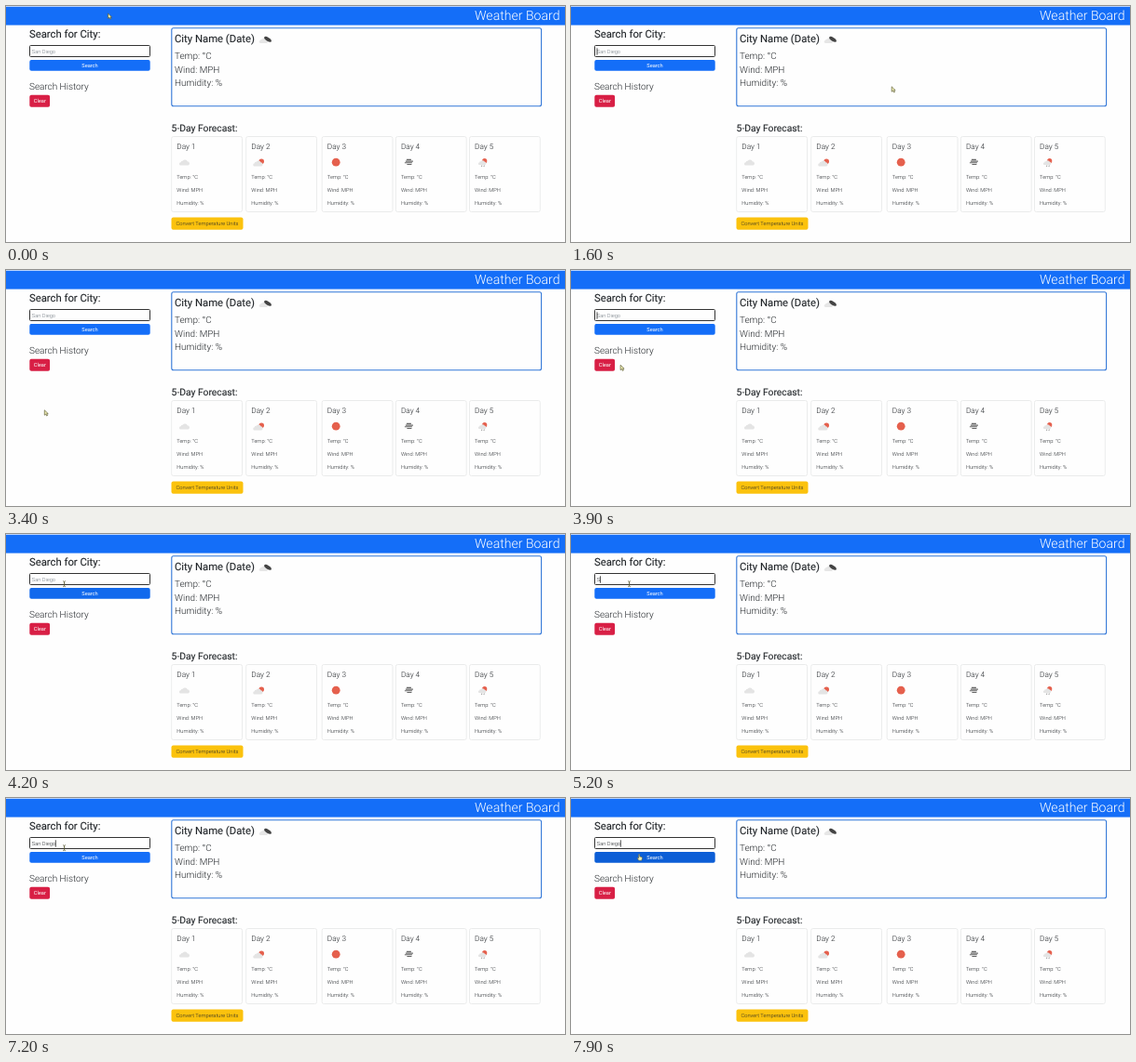
An HTML page for the animation above (8000 ms loop, 600x254 px).

```html
<!DOCTYPE html>
<html lang="en">
<head>
<meta charset="utf-8">
<title>Weather Board</title>
<style>
  html, body { margin: 0; width: 100%; height: 100%; overflow: hidden; background: #fefefe; }
  svg { display: block; width: 600px; height: 254px; }
  text { font: 300 5.7px Roboto, Inter, sans-serif; fill: #212529; text-rendering: geometricPrecision; }
  .brand { font-size: 14.1px; fill: #fff; text-anchor: end; }
  .heading { font-size: 11.3px; font-weight: 400; stroke: #212529; stroke-width: .12px; }
  .forecast { font-size: 10.3px; }
  .body { font-size: 9.95px; }
  .day { font-size: 8.2px; }
  .button { fill: #fff; font-weight: 400; text-anchor: middle; }
  .dark { fill: #212529; font-weight: 300; }
  .card { fill: #fefefe; stroke: #e6e7e8; stroke-width: .8; }
  .pointer { fill: #f1efb4; stroke: #55552f; stroke-width: .65; stroke-linejoin: round; }
</style>
</head>
<body>
<svg viewBox="0 0 600 254">
  <defs>
    <path id="cloud" d="M-5 4a2 2 0 0 1-.2-4 2 2 0 0 1 2.5-1.7A3.4 3.4 0 0 1 3.3-1.2 2.7 2.7 0 0 1 4.2 4Z"/>
  </defs>

  <rect y=".7" width="600" height="19.9" fill="#146ef8"/>
  <text class="brand" x="594.5" y="15.3">Weather Board</text>

  <text class="heading" x="25" y="33.6">Search for City:</text>
  <rect x="25.5" y="42.5" width="129" height="12" rx="1" fill="#fefefe" stroke="#333" stroke-width="1"/>
  <text id="field" x="27.8" y="51"></text>
  <rect id="caret" y="45.3" width=".8" height="7.4" fill="#222"/>
  <rect id="search" x="25.3" y="58" width="129.4" height="11.7" rx="2"/>
  <text class="button" x="90" y="66">Search</text>
  <text class="body" x="25" y="90.4">Search History</text>
  <rect x="25.3" y="95.7" width="21.8" height="13" rx="2" fill="#d81f45"/>
  <text class="button" x="36.3" y="104.4">Clear</text>

  <rect x="177.8" y="23.8" width="396.8" height="84" rx="2" fill="#fefefe" stroke="#3277d8" stroke-width="1.1"/>
  <text class="heading" x="181" y="38.8">City Name (Date)</text>
  <use href="#cloud" fill="#e6e6e6" transform="translate(277 37) scale(.75)"/>
  <ellipse rx="4.4" ry="1.9" fill="#444" transform="translate(281 35.8) rotate(32)"/>
  <text class="body" x="181" y="57">Temp: °C</text>
  <text class="body" x="181" y="71.5">Wind: MPH</text>
  <text class="body" x="181" y="86.2">Humidity: %</text>

  <text class="heading forecast" x="177.6" y="135.2">5-Day Forecast:</text>
  <g id="days"></g>
  <rect x="177.5" y="227.6" width="77" height="13.2" rx="2" fill="#fbc20d"/>
  <text class="button dark" x="216" y="236.2">Convert Temperature Units</text>

  <g id="cursor" class="pointer">
    <path id="arrow" d="M0 0V5.4L1.4 4.3 2.3 6.2 3.3 5.7 2.4 3.9H4Z"/>
    <path id="beam" fill="none" d="M-1.5-3Q0-3 0-2V2Q0 3-1.5 3M1.5-3Q0-3 0-2V2Q0 3 1.5 3"/>
    <path id="hand" stroke-width=".5" d="M-1.4-3.2Q-.8-3.8-.3-3.2V-.9L2-.4Q2.6 0 2.3 1.5L1.8 3.2H-1.3L-2.8.8Q-2.6 0-1.4.8Z"/>
  </g>
</svg>
<script>
const $ = id => document.getElementById(id);
const clamp = v => Math.max(0, Math.min(1, v));

const cloud = (x, y, s) =>
  `<use href="#cloud" fill="#e4e4e4" transform="translate(${x} ${y}) scale(${s})"/>`;
const sun = (x, y, r) => `<circle cx="${x}" cy="${y}" r="${r}" fill="#e5604d"/>`;
const lines = (d, color) => `<path d="${d}" fill="none" stroke="${color}" stroke-width="1.1"/>`;

// Icons are drawn around their own centre.
const icons = [
  cloud(.3, 0, .85),
  sun(2.5, -1, 2.8) + cloud(-.8, 1, .8),
  sun(1, 0, 4.4),
  lines('M-2.5-2.8H2.5M-3.5-1.1H4.5M-4.5.6H3.5M-2 2.3H3', '#666'),
  sun(2.2, -1.5, 2.6) + cloud(0, .2, .65) + lines('M-.5 3.4L-1.2 4.8M2 3.4L1.3 4.8', '#aaa')
];
const dayLefts = [177.7, 257.7, 339.2, 418.4, 497.5];
$('days').innerHTML = dayLefts.map((x, i) => `<g transform="translate(${x} 140.5)">
  <rect class="card" width="75.8" height="81" rx="2"/>
  <text class="day" x="5.6" y="13.6">Day ${i + 1}</text>
  <g transform="translate(14 27.7)">${icons[i]}</g>
  <text x="5.6" y="45.2">Temp: °C</text>
  <text x="5.6" y="59.4">Wind: MPH</text>
  <text x="5.6" y="73.4">Humidity: %</text></g>`).join('');

const LOOP = 8000, STEP = 100, BLINK = 500;
const city = 'San Diego';
const click = 4400;
// [time, letters typed so far]
const keys = [[5200, 1], [5500, 2], [5900, 3], [6100, 5], [6300, 6], [6500, 7], [6700, 8], [6900, 9]];
// [time, x, y]
const path = [
  [0, 109.5, 8], [100, 235, 50], [200, 344.2, 86.8], [3200, 344.2, 86.8], [3400, 41.3, 150.8],
  [3700, 41.3, 150.8], [4000, 59, 78], [4100, 62, 64], [4200, 62.5, 53.7],
  [7500, 62.5, 53.7], [7700, 74, 64], [LOOP, 74, 64]
];

function position(t) {
  const i = path.findIndex(p => p[0] > t);
  const [t0, x0, y0] = path[i - 1], [t1, x1, y1] = path[i];
  const k = (t - t0) / (t1 - t0);
  return [x0 + (x1 - x0) * k, y0 + (y1 - y0) * k];
}

function caretOn(t, lastKey) {
  if (t < 1500) return false;
  if (t < click) return Math.floor(t / BLINK) % 2 === 1;
  return Math.floor((t - lastKey) / BLINK) % 2 === 0;
}

const fade = (t, start, end) => clamp(Math.min((t - start) / 150, 1 - (t - end) / 150));

function draw(now) {
  const t = Math.floor(now % LOOP / STEP) * STEP;

  const [lastKey, count] = keys.filter(k => k[0] <= t).pop() || [click, 0];
  const field = $('field');
  field.textContent = count ? city.slice(0, count) : city;
  field.style.fill = count ? '#212529' : '#6c757d';
  $('caret').setAttribute('x', 27.6 + (count && field.getComputedTextLength()));
  $('caret').style.display = caretOn(t, lastKey) ? '' : 'none';

  const hover = Math.max(fade(t, 4000, 4100), fade(t, 7500, LOOP));
  $('search').style.fill = `rgb(${20 - 8 * hover},${110 - 16 * hover},${248 - 34 * hover})`;

  const [x, y] = position(t);
  const inColumn = x > 25 && x < 155;
  const shape = inColumn && y > 42 && y < 56 ? 'beam' : inColumn && y >= 58 && y < 70 ? 'hand' : 'arrow';
  for (const id of ['arrow', 'beam', 'hand']) $(id).style.display = id === shape ? '' : 'none';
  $('cursor').setAttribute('transform', `translate(${x} ${y})`);

  requestAnimationFrame(draw);
}
requestAnimationFrame(draw);
</script>
</body>
</html>
```
